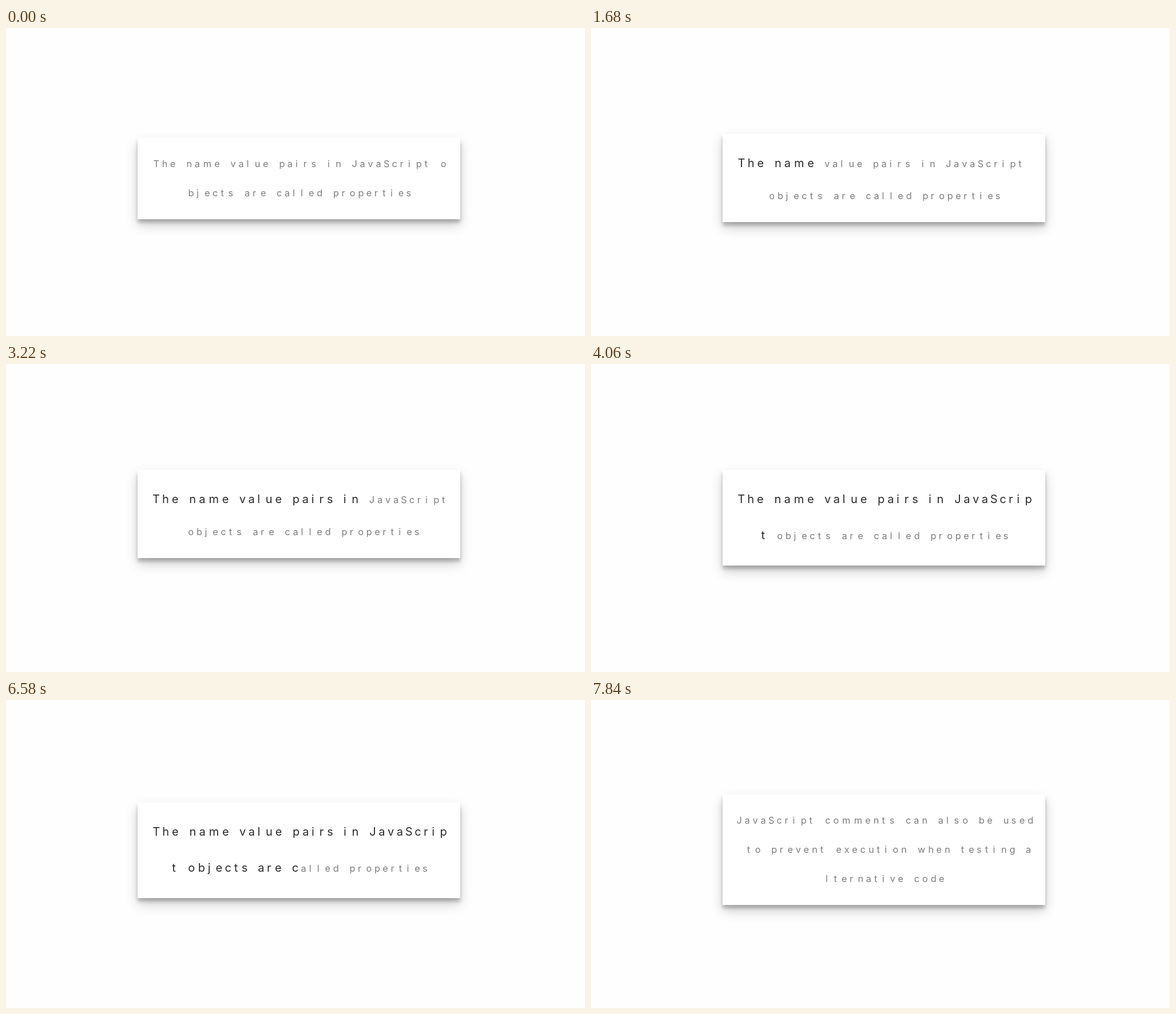
An HTML page with a canvas that plays this animation: 1012x538 px, repeating every 8000 ms.

```html
<!DOCTYPE html>
<html lang="en">
<head>
<meta charset="utf-8">
<title>Typing practice</title>
<style>
  html, body { margin: 0; width: 100%; height: 100%; overflow: hidden; background: #fefefe; }
  canvas { display: block; }
</style>
</head>
<body>
<canvas id="stage" width="1012" height="538"></canvas>
<script>
const ctx = document.getElementById('stage').getContext('2d');
const LOOP = 8000, STEP = 140;
const NEXT_PHRASE = 7700;
const CARD = { x: 230, width: 564, pad: 20 };
const MAX_LINE = CARD.width - 2 * CARD.pad;

const PHRASES = [
  'The name value pairs in JavaScript objects are called properties',
  'JavaScript comments can also be used to prevent execution when testing alternative code'
];

const STYLES = {
  waiting: { em: 16, font: '400 16.3px Inter, sans-serif', color: '#7c7c7c', height: 51, baseline: 31 },
  typed: { em: 20, font: '400 20px Inter, sans-serif', color: '#2a2a2a', height: 63.5, baseline: 38 }
};

// Letter widths in em, by group; a cell adds a gap in front and has a minimum width.
const WIDTHS = { m: 1.045, w: .9, bdghnopu: .67, acevxJST: .59, s: .5, frt: .39, ijl: .27 };
const GAP = 4, MIN_CELL = 14;

// Typing speed: [time, letters typed], linear in between
const PACE = [
  [0, 0], [840, 3], [1260, 4], [1680, 8], [3220, 23.3], [4060, 34],
  [4480, 37.4], [5600, 40], [6160, 42], [7280, 58], [7560, 64]
];

function typedAt(time) {
  const t = Math.floor((time + .01) / STEP) * STEP;
  const next = PACE.findIndex(([at]) => at > t);
  if (next < 0) return PHRASES[0].length;
  const [t0, n0] = PACE[next - 1], [t1, n1] = PACE[next];
  return Math.floor(n0 + (n1 - n0) * (t - t0) / (t1 - t0) + 1e-6);
}

function glyphWidth(ch, style) {
  const group = Object.keys(WIDTHS).find(letters => letters.includes(ch));
  return group ? WIDTHS[group] * style.em : 0;
}

// Breaks anywhere, letter by letter; spaces count as cells.
function layout(text, typed) {
  const lines = [];
  let line = null;
  [...text].forEach((ch, i) => {
    const style = i < typed ? STYLES.typed : STYLES.waiting;
    const glyph = glyphWidth(ch, style);
    const width = Math.max(MIN_CELL, glyph + GAP);
    if (!line || line.width + width > MAX_LINE) {
      line = { cells: [], width: 0, height: 0, baseline: 0 };
      lines.push(line);
    }
    line.cells.push({ ch, style, glyph, width });
    line.width += width;
    line.height = Math.max(line.height, style.height);
    line.baseline = Math.max(line.baseline, style.baseline);
  });
  return lines;
}

function cardHeight(lines) {
  return Math.floor(lines.reduce((sum, line) => sum + line.height, 2 * CARD.pad));
}

// The card is centred again only after a finished word, or one step into a new phrase.
function cardTop(t, typed) {
  const [first, second] = PHRASES;
  const settled = t < NEXT_PHRASE + STEP
    ? layout(first, typed ? first.lastIndexOf(' ', typed - 1) + 1 : 0)
    : layout(second, 0);
  return Math.floor(267.6 - .53 * cardHeight(settled));
}

function drawCard(top, height) {
  ctx.save();
  ctx.fillStyle = '#fff';
  for (const [offset, blur, alpha] of [[10, 20, .19], [6, 6, .23]]) {
    ctx.shadowColor = `rgba(0,0,0,${alpha})`;
    ctx.shadowOffsetY = offset;
    ctx.shadowBlur = blur;
    ctx.fillRect(CARD.x, top, CARD.width, height);
  }
  ctx.restore();
}

function drawLine(line, y) {
  let x = CARD.x + (CARD.width - line.width) / 2;
  for (const { ch, style, glyph, width } of line.cells) {
    ctx.font = style.font;
    ctx.fillStyle = style.color;
    ctx.fillText(ch, x + GAP + glyph / 2, y);
    x += width;
  }
}

function draw(t) {
  ctx.fillStyle = '#fefefe';
  ctx.fillRect(0, 0, 1012, 538);
  ctx.textAlign = 'center';
  ctx.textBaseline = 'alphabetic';

  const typed = typedAt(t);
  const lines = t < NEXT_PHRASE ? layout(PHRASES[0], typed) : layout(PHRASES[1], 0);
  const top = cardTop(t, typed);
  drawCard(top, cardHeight(lines));

  let y = top + CARD.pad;
  for (const line of lines) {
    drawLine(line, Math.floor(y + line.baseline));
    y += line.height;
  }
}

const start = performance.now();
function tick() {
  draw((performance.now() - start) % LOOP);
  requestAnimationFrame(tick);
}
tick();
</script>
</body>
</html>
```
